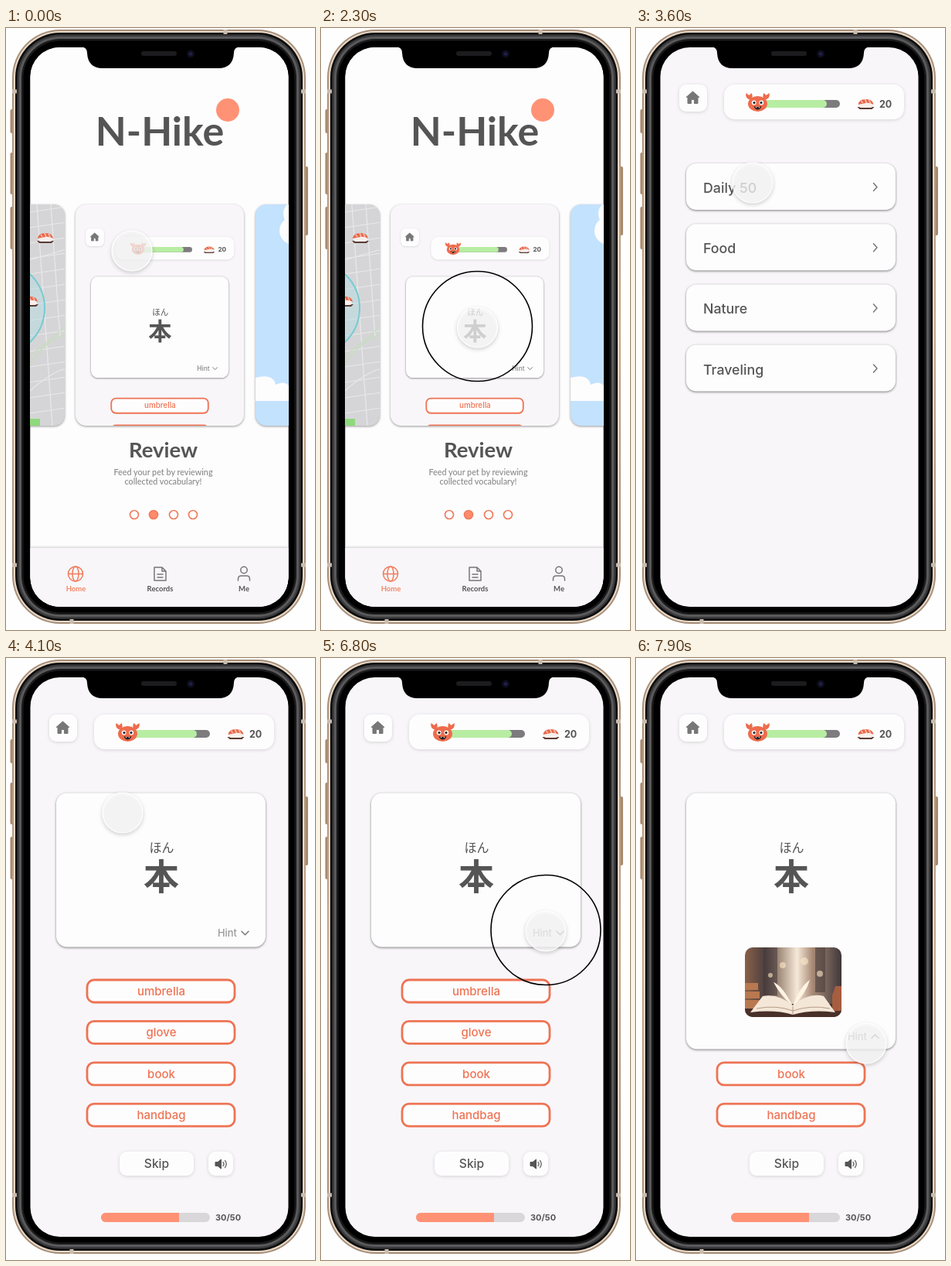
Write an HTML page that moves like this. It is 400 px wide and 778 px high and loops after 8000 ms.

```html
<!DOCTYPE html>
<html lang="ja">
<head>
<meta charset="utf-8">
<title>Vocabulary app</title>
<style>
html, body { margin: 0; width: 100%; height: 100%; overflow: hidden; background: #fefefe; }
svg { display: block; width: 400px; height: 778px; }
text { font-family: Inter, "Noto Sans", sans-serif; font-weight: 500; fill: #555; }
.mid { text-anchor: middle; }
.lato { font-family: Lato, "Open Sans", sans-serif; }
.bold { font-weight: 700; }
.jp { font-family: "Noto Sans CJK JP", "Noto Sans CJK", sans-serif; font-weight: 700; text-anchor: middle; }
.card { fill: #fefdfe; filter: drop-shadow(0 1px 1.5px rgba(0,0,0,.5)); }
.soft { fill: #fefdfe; filter: drop-shadow(0 1px 2px rgba(0,0,0,.14)); }
.btn { fill: #fefdfe; stroke: #ee7353; stroke-width: 2.8; }
.line { fill: none; stroke: #777; stroke-width: 1.5; stroke-linecap: round; stroke-linejoin: round; }
.coral { stroke: #f07c5c; }
</style>
</head>
<body>
<svg viewBox="0 0 400 778" xmlns="http://www.w3.org/2000/svg">
<defs>
  <clipPath id="screenClip"><rect x="31.5" y="25" width="334" height="723" rx="38"/></clipPath>
  <clipPath id="mapClip"><rect x="-140" y="228" width="216" height="286" rx="14"/></clipPath>
  <clipPath id="skyClip"><rect x="323" y="228" width="218" height="286" rx="14"/></clipPath>
  <clipPath id="miniClip"><rect x="90" y="228" width="218" height="286" rx="14"/></clipPath>
  <clipPath id="photoClip"><rect x="141" y="374" width="125" height="90" rx="10"/></clipPath>
  <linearGradient id="gold" x2="0" y2="1">
    <stop stop-color="#a58d78"/><stop offset=".5" stop-color="#c9ab8d"/><stop offset="1" stop-color="#a58d78"/>
  </linearGradient>
  <linearGradient id="library">
    <stop stop-color="#8a6048"/><stop offset=".2" stop-color="#4f4140"/><stop offset=".36" stop-color="#a58f7e"/>
    <stop offset=".54" stop-color="#f6e8d8"/><stop offset=".7" stop-color="#a88a76"/><stop offset="1" stop-color="#40373a"/>
  </linearGradient>
  <g id="crab">
    <g fill="#ee6c4d">
      <path d="M-9-3Q-17-5-15-12L-11-9L-8-12Q-5-7-9-3ZM9-3Q17-5 15-12L11-9L8-12Q5-7 9-3Z"/>
      <ellipse cy="2" rx="12.500" ry="10"/>
    </g>
    <g fill="#fff"><circle cx="-4.800" cy=".5" r="2.900"/><circle cx="4.800" cy=".5" r="2.900"/></g>
    <g fill="#222"><circle cx="-4.500" cy=".5" r="1.600"/><circle cx="4.500" cy=".5" r="1.600"/><path d="M-5 5Q0 7 5 5Q3.500 9.500 0 9.500T-5 5Z"/></g>
    <path d="M-3 6L-2 7.500L-1 6.300M1 6.300L2 7.500L3 6" fill="#fff"/>
  </g>
  <g id="sushi">
    <path d="M-11 4H11L8 7H-8Z" fill="#5a3a32"/>
    <rect x="-9" y="-2" width="18" height="7" rx="3" fill="#f6efec"/>
    <path d="M-10 1Q-9-6 0-6T10 1Q5-2 0-1T-10 1Z" fill="#e8694c"/>
    <path d="M-6-4L-4-1M-1-6L1-1M4-5L6-1" stroke="#ffd0c0" stroke-width="1.300"/>
  </g>
  <g id="homeButton">
    <rect class="soft" x="56" y="73" width="36" height="35" rx="9"/>
    <path d="M73.500 82L82 89.500H80V97.500H75.500V92.500H71.500V97.500H67V89.500H65Z" fill="#777" stroke="#777" stroke-linejoin="round"/>
  </g>
  <g id="status">
    <rect class="soft" x="114" y="73" width="233" height="45" rx="14"/>
    <rect x="158" y="93" width="106" height="10" rx="5" fill="#7d7b7e"/>
    <rect x="158" y="93" width="89" height="10" rx="5" fill="#b7eda2"/>
    <use href="#crab" x="157.500" y="96"/>
    <use href="#sushi" x="297.500" y="98"/>
    <text class="bold" x="315" y="102.500" font-size="12.500">20</text>
  </g>
  <g id="word">
    <text class="jp" x="201.500" y="250.500" font-size="16" style="font-weight:500">ほん</text>
    <text class="jp" x="201" y="299" font-size="46">本</text>
  </g>
</defs>

<g id="phone">
  <g fill="#a98a6c">
    <rect x="5.500" y="105" width="5" height="31" rx="2"/><rect x="5.500" y="161" width="5" height="54" rx="2"/>
    <rect x="5.500" y="231" width="5" height="55" rx="2"/><rect x="386" y="179" width="5" height="89" rx="2"/>
  </g>
  <rect x="8" y="2" width="380" height="768" rx="62" fill="url(#gold)"/>
  <rect x="10" y="4" width="376" height="764" rx="60" fill="#e9d9c8"/>
  <rect x="12" y="6" width="372" height="760" rx="58" fill="#0c0c0c"/>
  <rect x="14.500" y="8.500" width="367" height="755" rx="56" fill="#3a3a3c"/>
  <rect x="17" y="11" width="362" height="750" rx="53.500" fill="#5a5a5c"/>
  <rect x="20" y="14" width="356" height="744" rx="50.500" fill="#1a1a1b"/>
  <rect x="22.500" y="16.500" width="351" height="739" rx="48" fill="#000"/>
  <path d="M284 2V8M85 764V770M8 694H14M382 694H388M8 82H14M382 82H388" stroke="#c9bcae" stroke-width="5"/>
</g>

<g clip-path="url(#screenClip)">
  <rect x="31" y="25" width="335" height="723" fill="#f8f6f9"/>
  <g id="home">
    <rect x="31" y="25" width="335" height="723" fill="#fefdfe"/>
    <text class="mid lato bold" x="199" y="152" font-size="52">N-Hike</text>
    <circle cx="287" cy="106" r="15" fill="#ff9275"/>

    <g style="filter:drop-shadow(0 1px 1.500px rgba(0,0,0,.4))">
      <g clip-path="url(#mapClip)">
        <rect x="30" y="228" width="46" height="286" fill="#d5d5d7"/>
        <path id="roads" fill="none" stroke="#e9e9eb" stroke-width="1.200"/>
        <path d="M30 424Q58 404 78 384M30 436Q50 404 78 396" fill="none" stroke="#c8dcbf" stroke-width="1.500"/>
        <circle cx="-10" cy="362" r="60" fill="#b5dde3" fill-opacity=".5" stroke="#77cbd2" stroke-width="2"/>
        <use href="#sushi" x="51" y="271"/><use href="#sushi" x="31" y="353"/>
        <rect x="30" y="505" width="14" height="9" fill="#8fd87c"/>
      </g>
      <g clip-path="url(#skyClip)">
        <rect x="323" y="228" width="44" height="286" fill="#c3e2fe"/>
        <g fill="#fefdfe">
          <circle cx="372" cy="262" r="18"/><circle cx="376" cy="240" r="17"/>
          <path d="M323 482V452Q346 446 349 461Q360 455 367 463V482Z"/>
        </g>
      </g>
      <rect x="90" y="228" width="218" height="286" rx="14" fill="#f8f6f9"/>
    </g>
    <g clip-path="url(#miniClip)">
      <use href="#homeButton" transform="translate(66.500 211) scale(.657)"/>
      <use href="#status" transform="translate(67.500 222) scale(.657)"/>
      <g transform="translate(67.300 206.700) scale(.657)">
        <rect class="card" x="65" y="174.500" width="271" height="199" rx="14"/>
        <use href="#word"/>
        <text x="274" y="359.500" font-size="12.900" style="fill:#888">Hint</text>
        <path class="line" d="M305 353L309.500 357.500L314 353"/>
        <rect class="btn" x="105" y="414" width="191" height="29" rx="9"/>
        <text class="mid" x="201" y="433.500" font-size="15" style="fill:#ee7353">umbrella</text>
        <rect class="btn" x="105" y="467" width="191" height="29" rx="9"/>
      </g>
    </g>

    <text class="mid lato bold" x="203.500" y="555" font-size="27.500">Review</text>
    <g font-size="10.800">
      <text class="mid lato" x="203.500" y="577.500" style="fill:#888">Feed your pet by reviewing</text>
      <text class="mid lato" x="203.500" y="590" style="fill:#888">collected vocabulary!</text>
    </g>
    <g fill="none" stroke="#f07c5c" stroke-width="1.700">
      <circle cx="166" cy="629" r="5.500"/><circle cx="191" cy="629" r="5.500" fill="#ff8b6c"/>
      <circle cx="217" cy="629" r="5.500"/><circle cx="242" cy="629" r="5.500"/>
    </g>

    <rect x="31" y="672" width="335" height="80" fill="#f8f6f9" style="filter:drop-shadow(0 -1px 1.500px rgba(0,0,0,.2))"/>
    <g class="line coral">
      <circle cx="90" cy="705.500" r="9.500"/><ellipse cx="90" cy="705.500" rx="4" ry="9.500"/><path d="M80.500 705.500H99.500"/>
    </g>
    <path class="line" d="M194 697H202L207 702V714H192V697ZM202 697V702H207M196 706H203M196 710H203"/>
    <g class="line"><circle cx="308" cy="700.500" r="4.200"/><path d="M300.500 714V712Q300.500 708 304.500 708H311.500Q315.500 708 315.500 712V714"/></g>
    <text class="mid lato bold" x="90.500" y="728" font-size="9.500" style="fill:#f58566">Home</text>
    <text class="mid lato bold" x="199.500" y="728" font-size="9.500">Records</text>
    <text class="mid lato bold" x="308" y="728" font-size="9.500">Me</text>
  </g>

  <g id="header"><use href="#homeButton"/><use href="#status"/></g>
  <g id="list"></g>

  <g id="quiz">
    <g id="answers"></g>
    <rect class="soft" x="147" y="638" width="96" height="31" rx="9"/>
    <text class="mid" x="195" y="659" font-size="15.600">Skip</text>
    <rect class="soft" x="262" y="638" width="32" height="31" rx="9"/>
    <path d="M271 651.500H274L278.500 648V660L274 656.500H271Z" fill="#555" stroke="#555" stroke-linejoin="round"/>
    <path class="line" d="M281 651.500Q283 654 281 656.500M283.500 649.500Q287 654 283.500 658.500" stroke-width="1.200"/>
    <rect x="123" y="717" width="141" height="12" rx="6" fill="#d9d7da"/>
    <path d="M129 717H224V729H129A6 6 0 0 1 129 717Z" fill="#ff9275"/>
    <text class="bold" x="271" y="727" font-size="11">30/50</text>
    <rect class="card" id="wordCard" x="65" y="174.500" width="271" height="199" rx="14"/>
    <use href="#word"/>
    <g id="photo" clip-path="url(#photoClip)">
      <rect x="141" y="374" width="125" height="90" fill="url(#library)"/>
      <path d="M165 374H183V436H165ZM232 374H245V432H232Z" fill="#44383a" opacity=".55"/>
      <g fill="#ffe9c9" opacity=".6"><circle cx="190" cy="397" r="4"/><circle cx="218" cy="392" r="5"/><circle cx="174" cy="410" r="3"/><circle cx="238" cy="408" r="4"/></g>
      <rect x="141" y="447" width="125" height="17" fill="#493029"/>
      <path d="M141 420H158V429H141ZM141 431H160V440H141ZM141 442H161V453H141Z" fill="#b9784f"/>
      <path d="M258 424H266V456H254V436Z" fill="#a65d40"/>
      <path d="M148 458L164 437Q184 433 203 449Q224 432 243 437L258 458Q228 454 203 461Q180 454 148 458Z" fill="#f4e7d8"/>
      <path d="M203 450Q190 424 178 419Q186 435 203 450Q211 426 225 416Q220 434 203 450" fill="#fff3e2"/>
      <path d="M203 450V461M156 453Q182 448 203 456Q226 448 251 453" fill="none" stroke="#b59a84"/>
    </g>
    <g id="hint">
      <text x="274" y="360" font-size="12.900" style="fill:#999">Hint</text>
      <path class="line" id="chevron" d="M-4.500-2.200L0 2.200L4.500-2.200"/>
    </g>
  </g>
</g>

<path d="M97 24Q105 25 105 32Q106 52 125 52H275Q294 52 295 32Q295 25 303 24Z" fill="#000"/>
<rect x="175" y="30" width="46" height="6" rx="3" fill="#1c1c1e"/>
<circle cx="239" cy="33.500" r="5" fill="#0d0d1c"/><circle cx="239" cy="33.500" r="2.300" fill="#20204a"/>

<g id="cursor">
  <circle r="26" fill="#fdfdfd" fill-opacity=".75" stroke="#fff" stroke-width="1.200" style="filter:drop-shadow(0 2.500px 2.500px rgba(0,0,0,.22))"/>
  <circle id="ring" cy="-1.500" r="71" fill="none" stroke="#000" stroke-width="1.600"/>
</g>
</svg>
<script>
const LOOP = 8000;
const OPEN_LIST = 2500, OPEN_QUIZ = 4000, OPEN_HINT = 7000;
const PRESS = 200;
const START = [163, 288];
// begin, end, x, y
const MOVES = [
  [100, 500, 200, 386], [900, 1100, 202.5, 387], [3200, 3600, 151, 200],
  [5000, 5500, 287, 317], [5900, 6300, 291, 353], [7400, 7900, 298, 498]
];
const $ = id => document.getElementById(id);
const show = (id, on) => $(id).style.display = on ? '' : 'none';

const progress = (t, a, b) => {
  const p = Math.min(1, Math.max(0, (t - a) / (b - a)));
  return p * p * (3 - 2 * p);
};

$('list').innerHTML = ['Daily 50', 'Food', 'Nature', 'Traveling'].map((name, i) =>
  `<g transform="translate(0 ${175 + i * 78.2})">
    <rect class="card" x="65" width="271" height="60" rx="13"/>
    <text x="87" y="38" font-size="17.8">${name}</text>
    <path class="line" d="M307.500 25.500L312 30.500L307.500 35.500" stroke-width="1.300"/>
  </g>`).join('');

$('answers').innerHTML = ['umbrella', 'glove', 'book', 'handbag'].map((name, i) =>
  `<g transform="translate(0 ${416 + i * 53.4})">
    <rect class="btn" x="105" width="191" height="29" rx="9"/>
    <text class="mid" x="201" y="20" font-size="15" style="fill:#ee7353">${name}</text>
  </g>`).join('');

let roads = 'M40 228L60 514M58 228L70 400M30 300L78 286M30 470Q56 446 78 440';
for (let y = 238; y < 514; y += 20) roads += `M30 ${y}L78 ${y - 7}`;
$('roads').setAttribute('d', roads);

function draw(t) {
  show('home', t < OPEN_LIST);
  show('header', t >= OPEN_LIST);
  show('list', t >= OPEN_LIST && t < OPEN_QUIZ);
  show('quiz', t >= OPEN_QUIZ);
  show('ring', [OPEN_LIST, OPEN_QUIZ, OPEN_HINT].some(end => t >= end - PRESS && t < end));

  const open = progress(t, OPEN_HINT, OPEN_HINT + 300);
  $('wordCard').setAttribute('height', 199 + 132 * open);
  $('hint').setAttribute('transform', `translate(0 ${133.5 * open})`);
  $('chevron').setAttribute('transform', `translate(309.5 355.5) scale(1 ${1 - 2 * open})`);
  $('photo').setAttribute('opacity', progress(t, OPEN_HINT + 150, OPEN_HINT + 400));

  let [x, y] = START;
  for (const [begin, end, toX, toY] of MOVES) {
    const p = progress(t, begin, end);
    x += (toX - x) * p;
    y += (toY - y) * p;
  }
  $('cursor').setAttribute('transform', `translate(${x} ${y})`);
}

const origin = performance.now();
function tick(now) {
  draw(Math.max(0, now - origin) % LOOP);
  requestAnimationFrame(tick);
}
draw(0);
requestAnimationFrame(tick);
</script>
</body>
</html>
```
